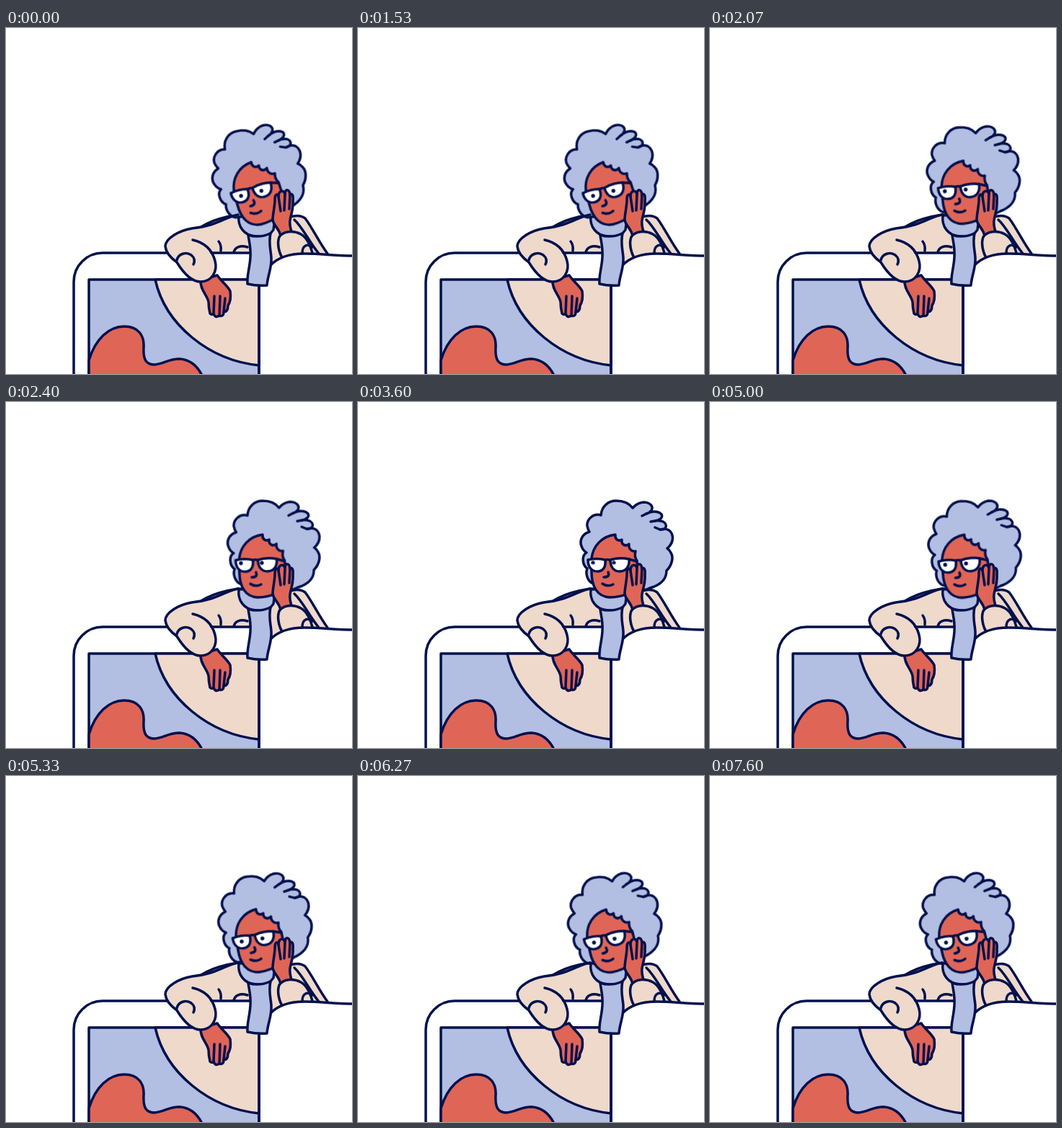
Recreate the animation shown at these times as an HTML page. Size 480 by 480 pixels, loop 7740 ms.

```html
<!DOCTYPE html>
<html lang="en">
<head>
<meta charset="utf-8">
<title>Leaning on the screen</title>
<style>
  html, body { margin: 0; width: 100%; height: 100%; overflow: hidden; background: #fff; }
  svg { display: block; width: 100vw; height: 100vh; }
  path { stroke: #00114c; stroke-width: 3.5; stroke-linecap: round; stroke-linejoin: round; }
  .line { fill: none; }
  .white { fill: #fff; }
  .blue { fill: #b2bee2; }
  .beige { fill: #eed9cb; }
  .coral { fill: #df6557; }
  .bare { stroke: none; }
  .pupil { fill: #00114c; }

  .hair, .face, .gaze, .pupil { animation: 7740ms linear infinite; }
  .hair, .face { animation-name: turn; }
  .hair { --tilt: -15.5deg; --drop: 0px; transform-origin: 362px 285px; }
  .face { --tilt: -14deg; --drop: 2.5px; transform-origin: 347px 252px; }
  .gaze { animation-name: gaze; }
  .pupil { transform-box: fill-box; transform-origin: center; animation-name: blink; }

  @keyframes turn {
    0% { transform: translateY(var(--drop)) rotate(var(--tilt)); }
    19.51% { transform: translateY(var(--drop)) rotate(var(--tilt)); animation-timing-function: cubic-bezier(.333, 0, .333, 1); }
    35.01% { transform: translateY(0px) rotate(0deg); }
    60.08% { transform: translateY(0px) rotate(0deg); animation-timing-function: cubic-bezier(.333, 0, .333, 1); }
    75.58%, 100% { transform: translateY(calc(var(--drop) * .76)) rotate(calc(var(--tilt) * .76)); }
  }
  @keyframes gaze {
    0% { transform: translate(0px, 0px); }
    19.51% { transform: translate(0px, 0px); animation-timing-function: cubic-bezier(.333, 0, .333, 1); }
    35.01% { transform: translate(-6px, -3px); }
    60.08% { transform: translate(-6px, -3px); animation-timing-function: cubic-bezier(.333, 0, .333, 1); }
    75.58%, 100% { transform: translate(0px, 0px); }
  }
  @keyframes blink {
    0%, 3.6%, 10.3%, 45.9%, 53.4%, 90.6%, 98.2%, 100% { transform: scaleY(1); }
    6.5%, 7.4%, 49.2%, 50.1%, 94%, 94.9% { transform: scaleY(.12); }
  }
</style>
</head>
<body>
<svg viewBox="0 0 480 480">
  <!-- Body -->
  <path class="beige" d="M322 259C290 264 262 274 250 300V330H446V313C434 297 425 277 415 264Q407 258 394 262Z"/>
  <path class="line" d="M316 312C317 304 325 301 335 304M400 266C412 277 420 296 434 313"/>

  <!-- Screen -->
  <path class="white bare" d="M94 484V352A40 40 0 0 1 134 312H366V484"/>
  <path class="line" d="M94 484V352A40 40 0 0 1 134 312H350"/>
  <path class="blue" d="M115 349H351V484H115Z"/>
  <path class="beige" d="M207 349C221 412 282 461 351 468V349Z"/>
  <path class="coral" d="M115 461C124 431 143 414 164 414C184 414 192 427 191 443C190 461 195 467 206 467C218 466 226 459 241 459C255 460 266 469 273 484H115Z"/>

  <!-- Scarf collar -->
  <path class="blue" d="M323 260C321 276 331 288 346 289C358 290 367 287 371 280L374 258Z"/>

  <!-- Head -->
  <g class="hair">
    <path class="blue" d="M381 147C375 139 367 137 358 137C347 137 338 145 337 157
      C326 154 317 163 318 172Q319 177 321 180C311 183 307 192 310 200Q312 206 317 209
      C310 213 311 226 318 231C315 239 319 249 326 252L397 261
      Q401 260 405 258C416 255 428 248 428 234C436 226 438 215 434 209Q432 205 429 203
      C440 194 439 177 425 176L419 177C430 178 430 167 420 165Q416 164 412 165
      C426 163 424 152 411 152Q406 152 400 155C414 150 408 139 396 139Q387 140 381 147Z"/>
    <path class="line" d="M400 155L394 158M412 165L406 166M419 177L412 174"/>
  </g>
  <g class="face">
    <path class="coral" d="M324 236L324 217C326 200 338 186 357 184C356 190 361 194 366 191C365 198 371 201 376 197
      C375 204 380 208 385 207Q383 215 387 220L389 250C381 265 366 271 349 271C332 270 324 256 324 236Z"/>
    <path class="white" d="M319 219Q331 216 343 219C344 229 340 235 332 235C324 235 319 229 319 219Z"/>
    <path class="white" d="M350 219Q363 215 376 218C377 228 372 235 363 235C355 235 350 229 350 219Z"/>
    <path class="line" d="M343 220Q346 217 350 220M376 218L386 221"/>
    <path class="line" d="M347 236Q350 243 341 243M339 252Q346 257 354 253"/>
    <g class="gaze">
      <circle class="pupil" cx="332" cy="226" r="2.7"/>
      <circle class="pupil" cx="361" cy="226" r="2.7"/>
    </g>
  </g>

  <!-- Raised hand and sleeve -->
  <path class="coral" d="M381 293C382 280 371 275 370 266C370 258 373 248 373 238C373 230 377 229 378 234
    C378 225 385 224 387 230C387 223 393 223 394 231C397 229 399 232 398 240C399 252 395 259 394 267
    C393 275 395 281 399 290Z"/>
  <path class="line" d="M378 234L381 254M387 230L386 253M394 231L393 251"/>
  <path class="beige" d="M384 320C378 311 376 298 379 290C384 282 398 280 409 286C418 291 423 303 426 316Z"/>
  <path class="line" d="M411 312C411 303 417 298 425 304"/>

  <!-- Foreground edge -->
  <path class="white bare" d="M366 330C378 317 394 313 414 313C438 313 456 316 484 316V484H366Z"/>
  <path class="line" d="M366 330C378 317 394 313 414 313C438 313 456 316 484 316"/>
  <path class="line" d="M351 349V484"/>

  <!-- Scarf tail -->
  <path class="blue" d="M336 287C337 296 340 304 339 318C338 334 334 343 335 355Q348 358 362 357
    C363 343 369 333 368 318C367 306 364 298 367 285Q351 292 336 287Z"/>

  <!-- Resting hand and arm -->
  <path class="coral" d="M270 350C269 363 279 370 281 380C281 387 282 392 283 396Q286 399 288 396
    Q290 403 296 399Q302 401 302 394Q308 394 308 385C312 379 312 372 311 365C307 357 299 352 293 343Z"/>
  <path class="line" d="M289 372L288 396M297 372L296 399M304 375L302 394"/>
  <path class="beige bare" d="M300 267C289 274 272 277 258 278C240 281 221 292 221 303C222 313 230 320 237 325
    C245 338 256 352 270 352C285 352 292 338 290 325L282 310H300Z"/>
  <path class="line" d="M322 259C304 262 292 275 258 278C240 281 221 292 221 303C222 313 230 320 237 325
    C245 338 256 352 270 352C285 352 294 338 290 323C286 308 277 298 259 294"/>
  <path class="line" d="M237 322C239 313 250 310 257 315C262 319 262 324 260 328M295 296Q299 301 298 309"/>
</svg>
</body>
</html>
```
